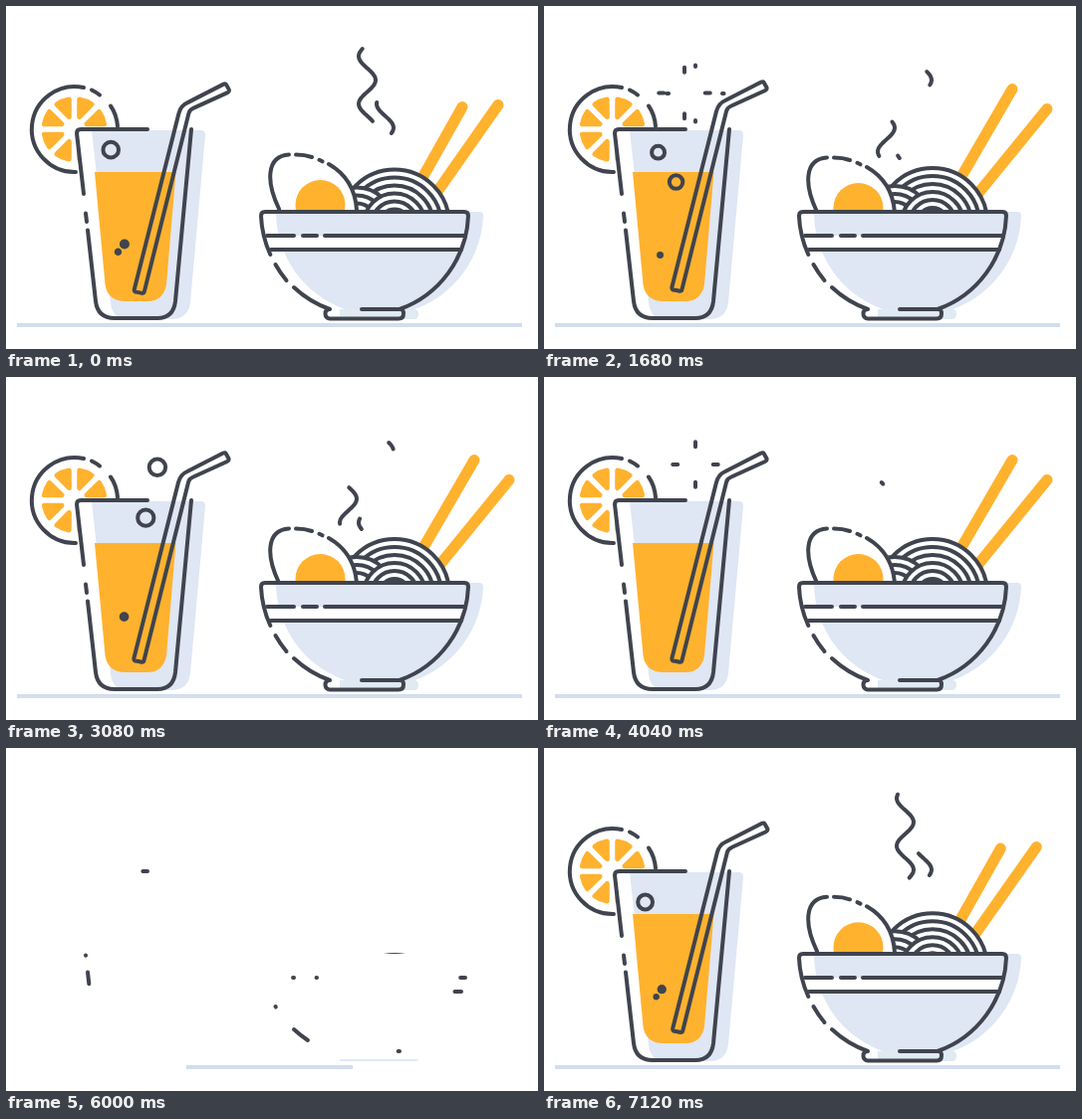
An HTML page that plays this animation: 534x345 px, repeating every 7160 ms.

```html
<!DOCTYPE html>
<html lang="en">
<head>
<meta charset="utf-8">
<title>Juice and noodles</title>
<style>
html, body { margin: 0; width: 100%; height: 100%; overflow: hidden; background: #fff; }
svg { display: block; width: 534px; height: 345px; }
.line { fill: none; stroke: #40444e; stroke-width: 4; stroke-linecap: round; stroke-linejoin: round; }
.full { fill: #fff; }
.pale { fill: #dfe6f4; }
.juice { fill: #ffb22e; }
.white { fill: #fff; }
.stick { stroke: #ffb22e; stroke-width: 11; stroke-linecap: round; }
</style>
</head>
<body>
<svg viewBox="0 0 534 345">
  <defs>
    <clipPath id="aboveRim"><path d="M0 0H534V207H0Z"/></clipPath>
    <clipPath id="inBowl"><path d="M256 207H464A104 104 0 0 1 256 207Z"/></clipPath>
  </defs>
  <path id="ground" stroke="#d3dded" stroke-width="4"/>

  <g id="slice">
    <circle class="white" cx="68.500" cy="124" r="43"/>
    <g id="wedges" class="juice" stroke="#ffb22e" stroke-width="5" stroke-linejoin="round"></g>
    <path class="line" d="M70 167A43 43 0 1 1 78 82"/>
    <path class="line" d="M86 84.5Q91 87 94 89.5M105 100.5Q111 109 112 121"/>
  </g>

  <path class="white" d="M72 124H186L170 300Q166 314 152 314H109Q92 314 90 297Z"/>
  <path id="glassShade" class="pale" d="M86 125H196Q200 125 200 130L185 298Q183 315 166 315H122Q107 315 105 299Z"/>
  <path id="liquid" class="juice" d="M89 167H170.500L161 280Q158 297 142 297H120Q102 297 99.500 280Z"/>
  <path id="fizz" class="line"/>
  <path id="straw" class="line" d="M133 286L129.500 285.500Q128 285 128.500 282.500L173 106Q175 98 182 95L218 76.500Q220 75.500 221 77.500L223.500 82Q224 84 222 85L188 100.500Q184 102 183 106L138.500 285Q138 287 136 286.700Z"/>
  <g class="line">
    <path class="trim" d="M142 124H75Q71 124 71 128L78 189"/>
    <path class="trim" d="M80 208.500L81 217"/>
    <path class="trim" d="M82 225.500L90 297Q92 314 109 314H152Q168 314 170 297L186 124"/>
  </g>

  <g clip-path="url(#aboveRim)">
    <path id="stickL" class="stick"/>
    <path id="stickR" class="stick"/>
    <g id="noodles"></g>
    <g id="egg">
      <path class="white" d="M275 210C260 180 260 156 283 153Q352 153 352 210Z"/>
      <circle class="juice" cx="315.500" cy="203" r="25"/>
      <path class="line" d="M274 207C261 180 261 154 284 152.500M291 152.500Q300 152.500 307 155M314.500 157.800L317.500 159.300M324 162Q350 177 352 208"/>
    </g>
  </g>

  <path class="white" d="M256 207H464A104 104 0 0 1 395 305H325A104 104 0 0 1 256 207Z"/>
  <g id="bowlShade">
    <path class="pale" d="M271 207H475Q479 207 479 211A104 104 0 0 1 410 305H340A104 104 0 0 1 271 207Z"/>
    <path class="white" clip-path="url(#inBowl)" d="M250 231H470V245H250Z"/>
  </g>
  <path id="baseShade" fill="#dfeaf2" d="M335 305H410Q414 305 414 310T409 315H335Z"/>
  <g class="line">
    <path class="trim" d="M289 283A104 104 0 0 0 325 305Q320.500 305 320.500 309.500T325 314.500H394Q399 314.500 399 309.500T395 305A104 104 0 0 0 464 211Q464 207 460 207H260Q256 207 256 211A104 104 0 0 0 265.300 250"/>
    <path class="trim" d="M270.500 260A104 104 0 0 0 281.500 276"/>
    <path class="trim" d="M289 231H262"/>
    <path class="trim" d="M312 231H298"/>
    <path class="trim" d="M461 231H320"/>
    <path class="trim" d="M457 245H266"/>
    <path class="trim" d="M395 305H357"/>
  </g>
  <path id="steam" class="line"/>
</svg>
<script>
const LOOP = 7160, STEP = 40, FRAMES = LOOP / STEP;
const $ = id => document.getElementById(id);
const set = (el, name, value) => el.setAttribute(name, value);
const smooth = u => (u = Math.max(0, Math.min(1, u)), u * u * (3 - 2 * u));
const ramp = (f, from, to) => smooth((f - from) / (to - from));
// Rises to 1 between a and b, falls back to 0 between c and d
const show = (f, a, b, c, d) => ramp(f, a, b) - ramp(f, c, d);

// Orange wedges with even gaps between them
const polar = (r, deg) => {
  const a = deg * Math.PI / 180;
  return `${68.5 + r * Math.cos(a)} ${124 + r * Math.sin(a)}`;
};
let wedges = '';
for (let a = 22.5; a < 360; a += 45) {
  wedges += `<path d="M${polar(13.5, a)}L${polar(30.5, a - 12.5)}A30.5 30.5 0 0 1 ${polar(30.5, a + 12.5)}Z"/>`;
}
$('wedges').innerHTML = wedges;

function coil(x, radius, rings) {
  let out = '';
  for (let i = 0; i < rings; i++) {
    out += `<circle class="line full" cx="${x}" cy="218" r="${radius - 8 * i}"/>`;
  }
  return out;
}
$('noodles').innerHTML = coil(390, 55, 3) + coil(352, 37, 3) + coil(390, 31, 3);

const trims = [...document.querySelectorAll('.trim')];
trims.concat($('straw')).forEach(el => set(el, 'pathLength', 1));
function trim(el, a, b) {
  el.style.display = b - a > 0.002 ? '' : 'none';
  set(el, 'stroke-dasharray', a <= 0 && b >= 1 ? 'none' : `${b - a} 2`);
  set(el, 'stroke-dashoffset', -a);
}
function scale(id, x, y, sx, sy) {
  $(id).style.display = sy > 0.004 ? '' : 'none';
  set($(id), 'transform', `translate(${x} ${y}) scale(${sx} ${sy}) translate(${-x} ${-y})`);
}
const move = (id, x, y) => set($(id), 'transform', `translate(${x} ${y})`);

// Each stream sends bubbles up its route at a fixed gap; they burst at the end
function stream(route, first, gap, count, life) {
  const path = document.createElementNS('http://www.w3.org/2000/svg', 'path');
  set(path, 'd', route);
  return { path, first, gap, count, life, length: path.getTotalLength() };
}
const streams = [
  stream('M116 253L152 88', -8, 15.5, 6, 28),
  stream('M113 253C108 200 106 170 116 143S205 65 104 46', -3.3, 31, 3, 22),
  stream('M115 253C96 190 96 164 106 143S136 106 141 87.5', -19.7, 32, 3, 25)
];
function bubble(s, age) {
  const late = age - s.life;
  if (age < 0 || late > 7) return '';
  const u = Math.min(1, age / s.life);
  const { x, y } = s.path.getPointAtLength(s.length * u * u);
  if (late < 0.3) {
    const r = 0.3 + 9.5 * u;
    const dot = r < 3.5 ? `M${x} ${y}h.01` : '';
    return `M${x - r} ${y}a${r} ${r} 0 1 0 ${2 * r} 0a${r} ${r} 0 1 0 ${-2 * r} 0Z${dot}`;
  }
  const d = 11.5 + 2.5 * late, n = Math.min(2.5, (7.2 - late) * 1.2);
  return `M${x - d - n} ${y}h${2 * n}M${x + d - n} ${y}h${2 * n}M${x} ${y - d - n}v${2 * n}M${x} ${y + d - n}v${2 * n}`;
}
function fizz(f) {
  let d = '';
  for (const s of streams) {
    for (let i = 0; i < s.count; i++) d += bubble(s, f - s.first - s.gap * i);
  }
  return d;
}

// Steam wisps run along waves of 48 px, repeating every 17 steps
const wisps = [
  { x: 362.5, low: 153, high: 43, start: -9.9 },
  { x: 343.5, low: 152, high: 106, start: 1.1 },
  { x: 380.5, low: 128, high: 66, start: -5 }
];
function wisp(w, f) {
  const age = f - w.start, local = age % 17;
  if (age <= 0 || age >= 17 * 6 || local <= 0 || local >= 16) return '';
  const y = t => w.low + (w.high - w.low) * smooth(t / 10);
  const tail = y(local - 6), head = y(local), count = Math.ceil((tail - head) / 2) + 1;
  let d = '';
  for (let i = 0; i <= count; i++) {
    const py = tail + (head - tail) * i / count;
    const px = w.x + 8.5 * Math.cos((py - 122.5) * Math.PI / 24);
    d += `${i ? 'L' : 'M'}${px.toFixed(2)} ${py.toFixed(2)}`;
  }
  return d;
}

function stick(id, x, y, baseX, baseY, grown) {
  $(id).style.display = grown > 0.01 ? '' : 'none';
  set($(id), 'd', `M${x} ${y}l${(baseX - x) * grown} ${(baseY - y) * grown}`);
}

function draw(f) {
  const ground = show(f, -31.5, -25, 124, 130.5);
  $('ground').style.display = ground > 0 ? '' : 'none';
  set($('ground'), 'd', `M${264.5 - 253.5 * ground} 321H${264.5 + 253.5 * ground}`);

  const drawn = show(f, -31, -13, 120, 130.5);
  trims.forEach(el => trim(el, 0, drawn));
  const shade = show(f, -28.5, -17, 122, 130);
  scale('glassShade', 143, 315, 1, shade);
  scale('bowlShade', 375, 305, 1, shade);
  scale('baseShade', 375, 315, 1, show(f, -31, -24, 122, 130));
  scale('liquid', 130, 297, 1, show(f, -20, -9, 115, 121));

  const slice = show(f, -22, -13, 115, 121), wedge = ramp(f, -17, -5);
  scale('slice', 68.5, 124, slice, slice);
  scale('wedges', 68.5, 124, wedge, wedge);

  const cut = 0.5 - 0.5 * show(f, -18, -6, 115, 127);
  trim($('straw'), cut, 1 - cut);
  const lift = 1 - show(f, -16, 2, 115, 126);
  move('straw', 11 * lift, 4 * show(f, -2, 1, 1, 8) - 24 * lift);

  // The chopsticks sway once while settling and leave one after the other
  const sway = show(f, -11, 0, 0, 9);
  const outL = ramp(f, 121, 127), outR = ramp(f, 115, 121);
  stick('stickL', 470 - 12 * sway + 12 * outL, 83.5 + 18 * sway - 25 * outL,
    410, 187, ramp(f, -16, -6) - outL);
  stick('stickR', 505 - 11 * sway + 13 * outR, 103.5 - 4 * sway - 16 * outR,
    428 - 3 * sway, 198, ramp(f, -14, -5) - outR);

  move('noodles', 0, 45 * (1 - show(f, -16, 2, 117, 129)));
  move('egg', 0, 60 * (1 - show(f, -16, -5, 115, 121)) - 3 * show(f, -5, 0, 0, 7));

  set($('fizz'), 'd', fizz(f));
  set($('steam'), 'd', wisps.map(w => wisp(w, f)).join(''));
}

const begin = performance.now();
function tick() {
  const elapsed = Math.max(0, performance.now() - begin);
  const f = Math.floor((elapsed % LOOP) / STEP);
  draw(f > 140 ? f - FRAMES : f);
  requestAnimationFrame(tick);
}
tick();
</script>
</body>
</html>
```
